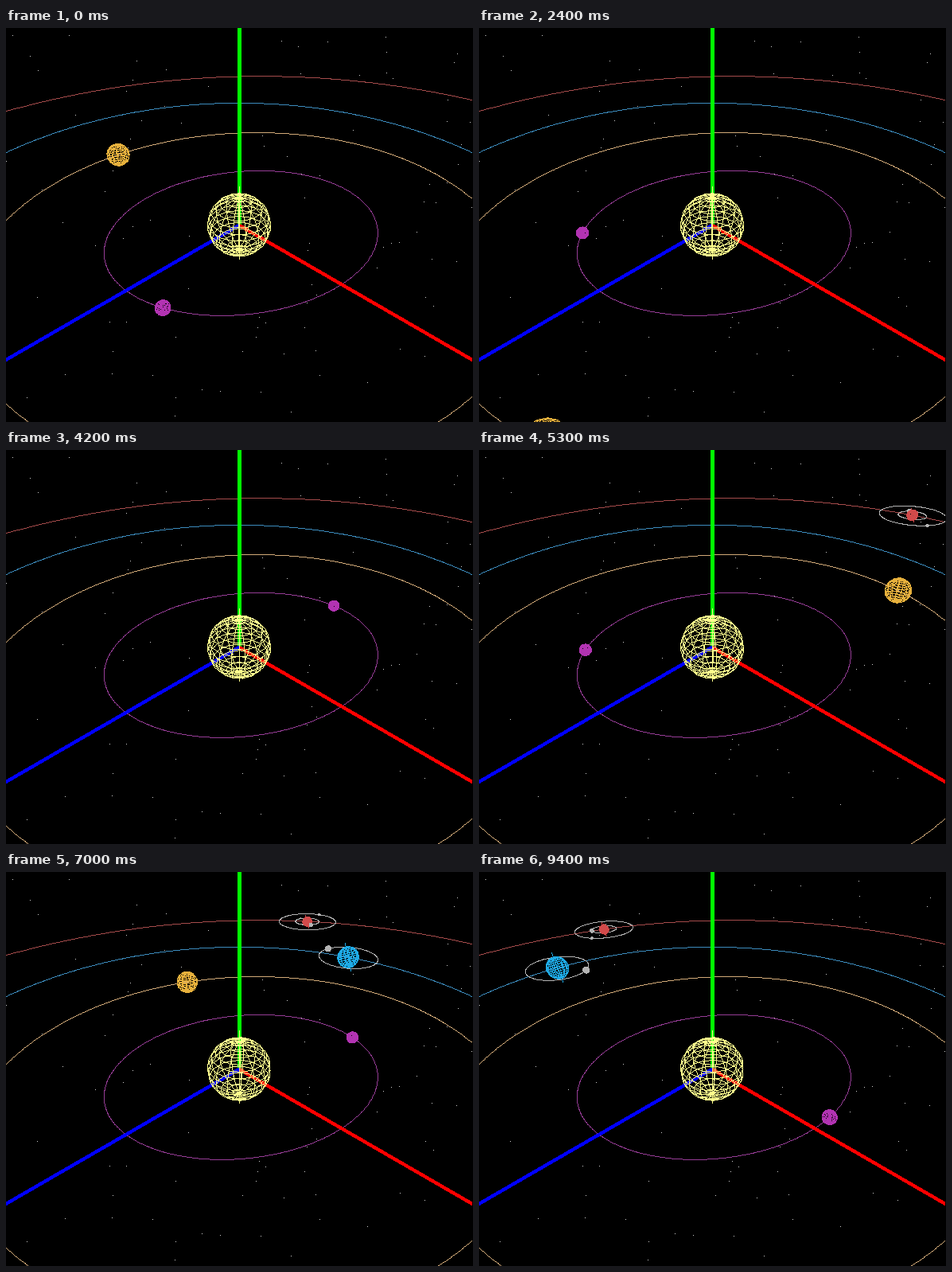
An HTML page with a canvas for the animation above (9.5 s loop, 587 px wide and 495 px high).

```html
<!DOCTYPE html>
<html lang="en">
<head>
<meta charset="utf-8">
<title>Planet orbits</title>
<style>
html, body { margin: 0; height: 100%; overflow: hidden; background: #000; }
canvas { display: block; }
</style>
</head>
<body>
<canvas id="stage" width="587" height="495"></canvas>
<script>
const ctx = document.getElementById('stage').getContext('2d');
const W = 586, H = 495, CX = W / 2, CY = H / 2, FOCAL = 563;
const LOOP = 9500, STEP = 100, RAD = Math.PI / 180;
const ORIGIN = [0, 0, 0], GREY = '#b4b4b4';

// Lengths are in units of the camera distance, angles in degrees.
const AU = .766, EARTH_SIZE = .0355, YEAR_SPEED = 29.6;

// au: orbit radius, start: angle from the far side, size: relative to Earth.
const planets = [
  { au: .387, incline: 7, start: 152.4, size: .38, color: '#b233b2', ring: '#963c96' },
  { au: .723, incline: 3.39, start: 41, size: .93, color: '#e6b03c', ring: '#d2aa78' },
  { au: 1, incline: 0, start: 123.6, size: 1, tilt: 23.4, color: '#1eaae6', ring: '#3c8cbe',
    moons: [{ orbit: .0996, start: 152, speed: 395, size: .28 }] },
  { au: 1.524, incline: 1.85, start: 235.4, size: .55, tilt: 25, color: '#d24a4a', ring: '#a54b4b',
    moons: [{ orbit: .051, start: 92, speed: 117, size: .2 },
            { orbit: .1206, start: 99, speed: 84, size: .12 }] }
];

// Small uneven beat in the clock, in seconds.
const clock = t => t - .015 + .025 * Math.cos(2 * Math.PI * t / 2.5);

function seededRandom(seed) {
  return () => (seed = seed * 16807 % 2147483647) / 2147483647;
}

const random = seededRandom(71);
const stars = Array.from({ length: 100 }, () => [Math.floor(random() * W), Math.floor(random() * H)]);

const add = (a, b) => a.map((v, i) => v + b[i]);
const depth = ([x, y, z]) => (x + y + z) / Math.sqrt(3);

// Isometric viewing direction with perspective.
function project(p) {
  const [x, y, z] = p, scale = FOCAL / (1 - depth(p));
  return [CX + scale * (x - z) / Math.SQRT2, CY - scale * (2 * y - x - z) / Math.sqrt(6)];
}

function rotateZ([x, y, z], angle) {
  const c = Math.cos(angle * RAD), s = Math.sin(angle * RAD);
  return [x * c - y * s, x * s + y * c, z];
}

function onCircle(radius, angle, y = 0) {
  const a = (angle + 135) * RAD;
  return [radius * Math.cos(a), y, -radius * Math.sin(a)];
}

// Hard-edged line; its width is counted across the main direction.
function pixelLine([x0, y0], [x1, y1], width = 1) {
  if (Math.max(x0, x1) < 0 || Math.min(x0, x1) > W || Math.max(y0, y1) < 0 || Math.min(y0, y1) > H) return;
  const dx = x1 - x0, dy = y1 - y0, flat = Math.abs(dx) > Math.abs(dy);
  const n = Math.ceil(Math.max(Math.abs(dx), Math.abs(dy))) || 1, side = (width - 1) / 2;
  if (n > 1000) return;
  for (let i = 0; i <= n; i++) {
    const x = Math.floor(x0 + dx * i / n), y = Math.floor(y0 + dy * i / n);
    if (flat) ctx.fillRect(x, y - side, 1, width);
    else ctx.fillRect(x - side, y, width, 1);
  }
}

function curve(count, pointAt) {
  let last = project(pointAt(0));
  for (let i = 1; i <= count; i++) {
    const next = project(pointAt(i / count));
    pixelLine(last, next);
    last = next;
  }
}

function circle(center, radius, incline, color) {
  ctx.fillStyle = color;
  curve(240, u => add(center, rotateZ(onCircle(radius, 360 * u), incline)));
}

// Wire sphere; a given tilt also shows the spin axis.
function sphere(center, r, color, spin, tilt) {
  const lines = 15;
  const place = p => add(center, rotateZ(p, tilt ?? 0));
  const at = (lat, lon) => place(onCircle(r * Math.cos(lat * RAD), lon + spin, r * Math.sin(lat * RAD)));
  ctx.fillStyle = color;
  for (let i = 0; i < lines; i++) {
    curve(lines, u => at(180 * u - 90, 360 * i / lines));
    curve(lines, u => at(180 * i / lines - 90, 360 * u));
  }
  if (tilt !== undefined) curve(1, u => place([0, r * 1.4 * (2 * u - 1), 0]));
}

function axis(end, color) {
  ctx.fillStyle = color;
  pixelLine(project(ORIGIN), project(end), 5);
}

function drawPlanet({ center, planet, time }) {
  const { size, tilt, incline, color, moons = [] } = planet;
  const parts = moons.map(moon => {
    const pos = rotateZ(onCircle(moon.orbit, moon.start + moon.speed * time), incline);
    return { near: depth(pos), draw: () => sphere(add(center, pos), moon.size * EARTH_SIZE, GREY, 0) };
  });
  parts.push({ near: 0, draw: () => sphere(center, size * EARTH_SIZE, color, 60 * time, tilt) });
  moons.forEach(moon => circle(center, moon.orbit, incline, GREY));
  parts.sort((a, b) => a.near - b.near).forEach(part => part.draw());
}

function draw(time) {
  ctx.fillStyle = '#000';
  ctx.fillRect(0, 0, W + 1, H);
  ctx.fillStyle = '#ccc';
  stars.forEach(([x, y]) => ctx.fillRect(x, y, 1, 1));

  const bodies = planets.map(planet => {
    const angle = planet.start + YEAR_SPEED * time / planet.au ** 1.5;
    return { planet, time, center: rotateZ(onCircle(planet.au * AU, angle), planet.incline) };
  }).sort((a, b) => depth(a.center) - depth(b.center));

  planets.forEach(p => circle(ORIGIN, p.au * AU, p.incline, p.ring));
  bodies.filter(b => depth(b.center) < 0).forEach(drawPlanet);
  axis([0, .9, 0], '#0f0');
  axis([.9, 0, 0], '#f00');
  axis([0, 0, .9], '#00f');
  sphere(ORIGIN, .0706, '#ffff8c', 40 * time, 0);
  bodies.filter(b => depth(b.center) >= 0).forEach(drawPlanet);
  ctx.clearRect(W, 0, 1, H);
}

let shown = -1;
function tick() {
  const step = Math.floor(performance.now() % LOOP / STEP);
  if (step !== shown) draw(clock(step * STEP / 1000));
  shown = step;
  requestAnimationFrame(tick);
}
tick();
</script>
</body>
</html>
```
